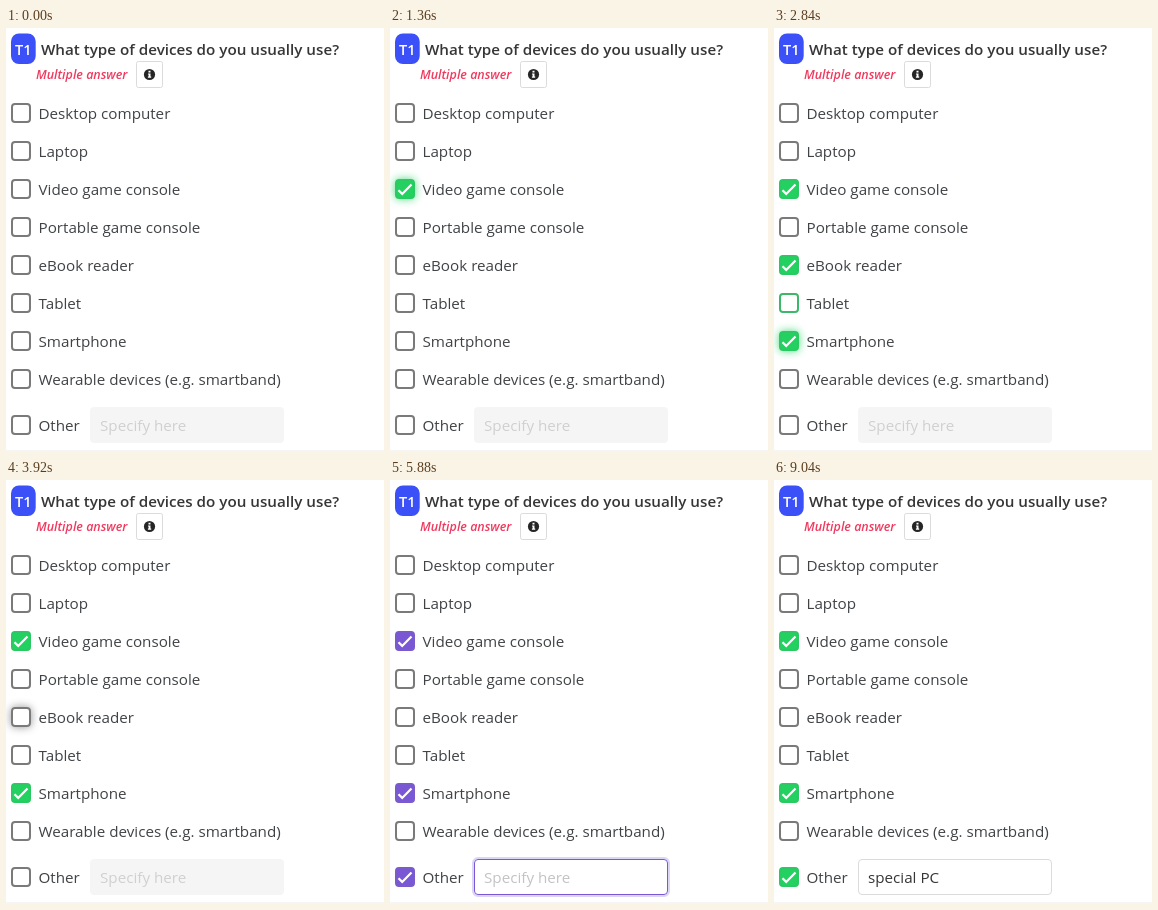
An HTML page for the animation above (9.08 s loop, 378x424 px).

```html
<!DOCTYPE html>
<html lang="en">
<head>
<meta charset="utf-8">
<title>Device survey</title>
<style>
  html, body { margin: 0; width: 100%; height: 100%; overflow: hidden; background: #fff; }
  svg { display: block; width: 378px; height: 424px; }
  text { font: 15.2px "Open Sans", "Noto Sans", sans-serif; fill: #404346; white-space: pre; }
  .title { font-weight: 600; fill: #363636; }
  .badge { font-weight: 600; font-size: 14.5px; fill: #fff; text-anchor: middle; }
  .hint { font-weight: 600; font-style: italic; font-size: 12.5px; fill: #f03a5f; }
</style>
</head>
<body>
<svg id="stage" viewBox="0 0 378 424">
  <defs>
    <filter id="blur" x="-100%" y="-100%" width="300%" height="300%">
      <feGaussianBlur stdDeviation="4"/>
    </filter>
  </defs>
  <rect width="378" height="424" fill="#fff"/>
  <rect y="422" width="378" height="2" fill="#f5f5f5"/>
  <rect x="5" y="5.5" width="24.7" height="30.5" rx="8" fill="#3b50f6"/>
  <text class="badge" x="17.3" y="27">T1</text>
  <text class="title" x="35" y="27">What type of devices do you usually use?</text>
  <text class="hint" x="30" y="51">Multiple answer</text>
  <rect x="130.5" y="33.5" width="26" height="26" rx="2" fill="#fff" stroke="#dbdbdb"/>
  <circle cx="143.5" cy="46.5" r="5.6" fill="#252525"/>
  <path d="M142.5 42.8h2v1.8h-2zM142 45.4h2.5v3.2h.7v1.2h-3.3v-1.2h.7v-2h-.6z" fill="#fff"/>
  <g id="rows"></g>
  <rect id="ring" x="83" y="378" width="196" height="38" rx="5" fill="none" stroke="#7957d5" stroke-opacity=".25" stroke-width="2"/>
  <rect id="field" x="84.5" y="379.5" width="193" height="35" rx="3.5"/>
  <text id="entry" x="94" y="403"></text>
  <path id="squiggle" fill="none" stroke="#e0303c" stroke-width="1"/>
  <rect id="caret" y="387" width="1" height="20" fill="#000"/>
</svg>
<script>
const LOOP = 9080, FADE = 150;
const GREEN = [35, 209, 96], PURPLE = [121, 87, 213], GREY = [122, 122, 122];
const OTHER = 4480, FOCUS = 5240, FIRST_KEY = 6400, BLUR = 9040;
const WORDS = "special PC";
const keys = [...Array(8).keys()].map(i => FIRST_KEY + i * 120).concat(8040, 8380);

const rows = [
  { label: "Desktop computer", y: 85 },
  { label: "Laptop", y: 123 },
  { label: "Video game console", y: 161, clicks: [800] },
  { label: "Portable game console", y: 199 },
  { label: "eBook reader", y: 237, clicks: [1880, 3400] },
  { label: "Tablet", y: 275 },
  { label: "Smartphone", y: 313, clicks: [2480] },
  { label: "Wearable devices (e.g. smartband)", y: 351 },
  { label: "Other", y: 397, clicks: [OTHER] }
];

// Pointer visits: row, from, to
const hovers = [
  [2, 600, 1240], [3, 1400, 1560], [4, 1600, 2120], [5, 2160, 2280],
  [6, 2320, 2720], [5, 2760, 2920], [4, 2960, 3680], [5, 3720, 3840],
  [7, 4040, 4160], [8, 4240, 5080]
];

const $ = id => document.getElementById(id);
const set = (node, attrs) => { for (const k in attrs) node.setAttribute(k, attrs[k]); };
const show = (node, on) => set(node, { visibility: on ? "visible" : "hidden" });
const rgb = c => `rgb(${c.map(Math.round)})`;
const mix = (a, b, k) => a.map((v, i) => v + (b[i] - v) * k);
const ease = (t, start) => {
  const k = Math.min(1, Math.max(0, (t - start) / FADE));
  return 1 - (1 - k) ** 2;
};

function add(parent, tag, attrs) {
  const node = document.createElementNS("http://www.w3.org/2000/svg", tag);
  set(node, attrs);
  return parent.appendChild(node);
}

rows.forEach(row => {
  const g = add($("rows"), "g", { transform: `translate(5 ${row.y - 10})` });
  row.glow = add(g, "rect", { width: 20, height: 20, rx: 4, opacity: 0.8, filter: "url(#blur)" });
  add(g, "rect", { width: 20, height: 20, rx: 4, fill: "#fff" });
  row.fill = add(g, "rect", { x: 1, y: 1, width: 18, height: 18, rx: 3 });
  row.edge = add(g, "rect", { x: 1, y: 1, width: 18, height: 18, rx: 3, fill: "none", "stroke-width": 2 });
  row.tick = add(g, "path", { d: "M3.5 11.2L7.2 14.9L16.5 5.5", fill: "none", stroke: "#fff", "stroke-width": 2.2 });
  add(g, "text", { x: 27.5, y: 16 }).textContent = row.label;
});

const clicks = rows.flatMap((row, i) => (row.clicks || []).map(at => ({ i, at })))
  .sort((a, b) => a.at - b.at);

function drawRows(t) {
  const empty = t >= OTHER && t < FIRST_KEY;
  const accent = empty ? PURPLE : GREEN;
  const paint = mix(GREEN, PURPLE, ease(t, OTHER) - ease(t, FIRST_KEY));
  const last = clicks.filter(c => c.at <= t).pop();
  const focused = last && t < FOCUS ? last.i : -1;
  rows.forEach((row, i) => {
    const past = (row.clicks || []).filter(at => at <= t);
    const on = past.length % 2 === 1;
    const level = past.length ? ease(t, past[past.length - 1]) : 0;
    const over = hovers.some(([r, a, b]) => r === i && t >= a && t < b);
    show(row.glow, i === focused);
    set(row.glow, { fill: rgb(on ? accent : GREY) });
    set(row.fill, { fill: rgb(paint), opacity: on ? level : past.length ? 1 - level : 0 });
    set(row.edge, { stroke: rgb(mix(accent, GREY, on ? 0.1 : over ? 0.3 : 1)) });
    show(row.tick, on);
  });
}

function drawField(t) {
  const enabled = t >= OTHER, active = t >= FOCUS && t < BLUR;
  const count = keys.filter(k => k <= t).length;
  const typed = WORDS.slice(0, count);
  const entry = $("entry");
  set($("field"), {
    fill: enabled ? "#fff" : "#f5f5f5",
    stroke: !enabled ? "#f5f5f5" : active ? "#7957d5" : t < FOCUS ? "#b5b5b5" : "#dbdbdb"
  });
  show($("ring"), active);
  entry.textContent = typed || "Specify here";
  entry.style.fill = typed ? "#363636" : enabled ? "#c3c3c3" : "#d0d0d0";
  const since = t - (count ? keys[count - 1] : FOCUS);
  show($("caret"), active && since % 1000 < 500);
  set($("caret"), { x: Math.round(94 + (count ? entry.getSubStringLength(0, count) : 0)) });
  show($("squiggle"), active && count > 7);
}

let wave = "M94 405.5";
for (let x = 96; x <= 142; x += 2) wave += `L${x} ${x % 4 ? 405.5 : 407}`;
set($("squiggle"), { d: wave });

function render(now) {
  const t = now % LOOP;
  drawRows(t);
  drawField(t);
}

const start = performance.now();
function tick() {
  render(performance.now() - start);
  requestAnimationFrame(tick);
}
tick();
</script>
</body>
</html>
```
